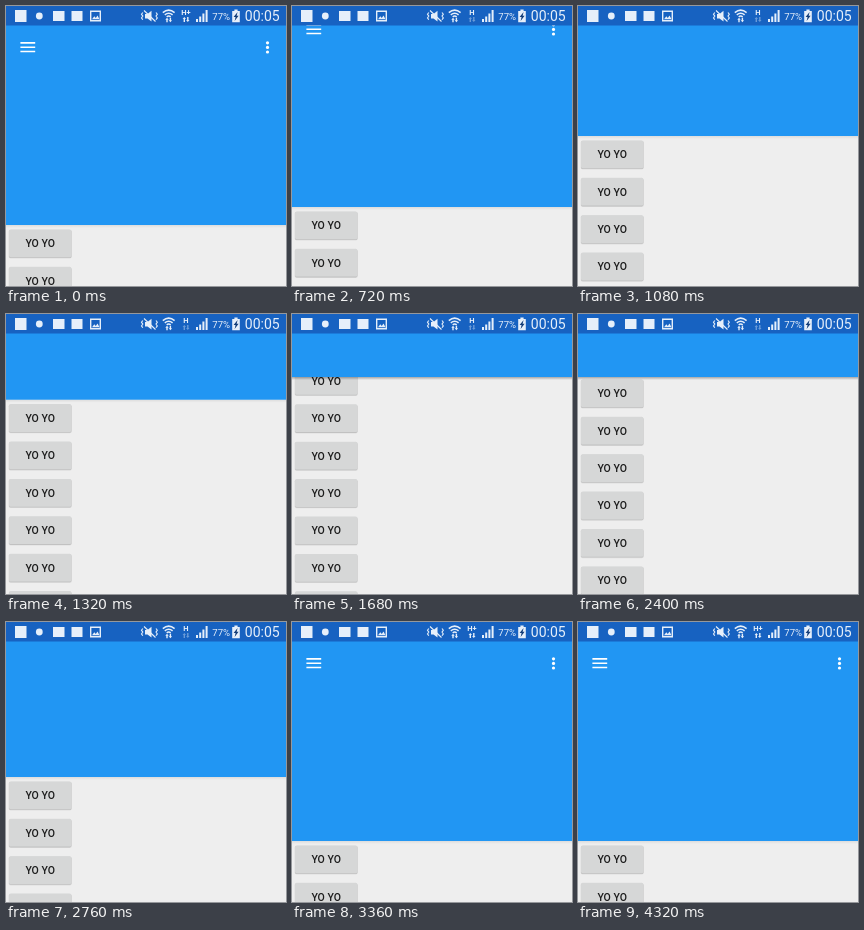
These frames come from a looping animation (280 px wide and 280 px high, 4440 ms). An HTML page:

```html
<!DOCTYPE html>
<html lang="en">
<head>
<meta charset="utf-8">
<title>Collapsing header</title>
<style>
  html, body { margin: 0; width: 100%; height: 100%; overflow: hidden; background: #eee; }
  svg { display: block; width: 100vw; height: 100vh; font-family: Roboto, "Noto Sans", sans-serif; }
</style>
</head>
<body>
<svg viewBox="0 0 280 280">
  <defs>
    <linearGradient id="shade" x2="0" y2="1">
      <stop offset="0" stop-color="#000" stop-opacity=".3"/>
      <stop offset="1" stop-color="#000" stop-opacity="0"/>
    </linearGradient>
    <g id="button">
      <rect x="2.6" y="4.8" width="63.2" height="28.8" rx="2" fill="#000" opacity=".07"/>
      <rect x="3" y="5" width="62.4" height="28" rx="1.6" fill="#000" opacity=".13"/>
      <rect x="3" y="4.4" width="62.4" height="27.8" rx="1.6" fill="#d6d7d7"/>
      <text x="34.2" y="22.3" font-size="10.5" font-weight="500" text-anchor="middle" fill="#1c1c1c">YO YO</text>
    </g>
  </defs>
  <rect width="280" height="280" fill="#eee"/>
  <g id="list"></g>
  <rect id="shadow" width="280" height="3" fill="url(#shade)"/>
  <rect id="header" width="280" fill="#2196f3"/>
  <g id="icons" fill="#fff">
    <path d="M14.4 36.9h14.8M14.4 41.2h14.8M14.4 45.5h14.8" stroke="#fff" stroke-width="1.6"/>
    <circle cx="261.5" cy="36.8" r="1.6"/>
    <circle cx="261.5" cy="41.4" r="1.6"/>
    <circle cx="261.5" cy="46" r="1.6"/>
  </g>
  <rect width="280" height="19.5" fill="#1762c1"/>
  <g fill="#e6effa">
    <rect x="9" y="4" width="11.5" height="12"/>
    <circle cx="33.3" cy="10" r="3.4"/>
    <rect x="47" y="5" width="11.5" height="10"/>
    <rect x="65.5" y="5" width="11" height="10"/>
    <path fill-rule="evenodd" d="M84 4.5h11v11h-11zM85.4 5.9v8.2h8.2v-8.2z"/>
    <path d="M86 13.3l2.3-3 1.5 1.6 1.7-2.4 2 3.8z"/>
    <!-- muted speaker -->
    <path d="M139 8h2.5l4-3.2v10.8l-4-3.2h-2.5z"/>
    <path d="M138 4.5l11.5 11M136.8 6.5l-1.3 1.8 1.3 1.8-1.3 1.8 1.3 1.8M150 6.5l1.3 1.8-1.3 1.8 1.3 1.8-1.3 1.8"
      fill="none" stroke="#e6effa" stroke-width="1.1"/>
    <!-- wireless -->
    <path d="M156.8 6.6q5.9-5 11.8 0M158.8 8.8q3.9-3.2 7.8 0M160.7 10.8q2-1.5 4 0"
      fill="none" stroke="#e6effa" stroke-width="1.5"/>
    <path d="M161 11.8l1.7 2h-1v2.5h-1.4v-2.5h-1zM164.4 16.3l-1.7-2h1v-2.5h1.4v2.5h1z"/>
    <!-- mobile data -->
    <text id="net" x="180" y="9" font-size="7.5" font-weight="700" text-anchor="middle"></text>
    <path id="arrows" d="M178.3 11l1.7 2h-1v3h-1.4v-3h-1zM181.8 16l-1.7-2h1v-3h1.4v3h1z"/>
    <path d="M190 13h2v3h-2zM193.2 10.5h2v5.500h-2zM196.400 7.500h2v8.500h-2zM199.600 4h2v12h-2z"/>
    <text x="206.300" y="13.600" font-size="9.600">77%</text>
    <path d="M228.400 3.600h3.200v1.400h2.200v11.200h-7.600v-11.200h2.200z"/>
    <path d="M231.600 6l-4 5h2l-1 4 4-5.200h-2z" fill="#123c78"/>
    <text x="238.800" y="15" font-size="14">00:05</text>
  </g>
</svg>
<script>
const STEP = 120, LOOP = 4440, OPEN = 219, CLOSED = 63, PITCH = 37.4;
const el = id => document.getElementById(id);

// Drag path: [step, scroll in px, speed in px per step]
const path = [[3, 0, 0], [6, 18, 14], [9, 89, 27], [14, 170.5, 8],
              [16, 180, 1], [20, 158, -15], [23, 64, -53], [24, 0, -70]];

function scrollAt(step) {
  const i = path.findIndex(p => p[0] > step);
  if (i < 1) return 0;
  const [a, from, v0] = path[i - 1], [b, to, v1] = path[i];
  const d = b - a, u = (step - a) / d, w = 1 - u;
  return from * w * w * (1 + 2 * u) + to * u * u * (3 - 2 * u)
       + d * u * w * (v0 * w - v1 * u);
}

for (let i = 0; i < 9; i++)
  el("list").innerHTML += `<use href="#button" y="${i * PITCH}"/>`;

function draw() {
  const step = Math.floor(performance.now() % LOOP / STEP);
  const scroll = scrollAt(step);
  const edge = Math.max(CLOSED, OPEN - scroll);
  const plus = step < 4 || step >= 28;
  el("list").setAttribute("transform", `translate(0 ${OPEN - scroll})`);
  el("header").setAttribute("height", edge);
  el("shadow").setAttribute("y", edge);
  el("shadow").setAttribute("opacity", edge > CLOSED ? 0.25 : 1);
  el("icons").setAttribute("transform", `translate(0 ${-scroll})`);
  el("net").textContent = plus ? "H+" : "H";
  el("arrows").setAttribute("opacity", plus ? 1 : 0.4);
  requestAnimationFrame(draw);
}
draw();
</script>
</body>
</html>
```
